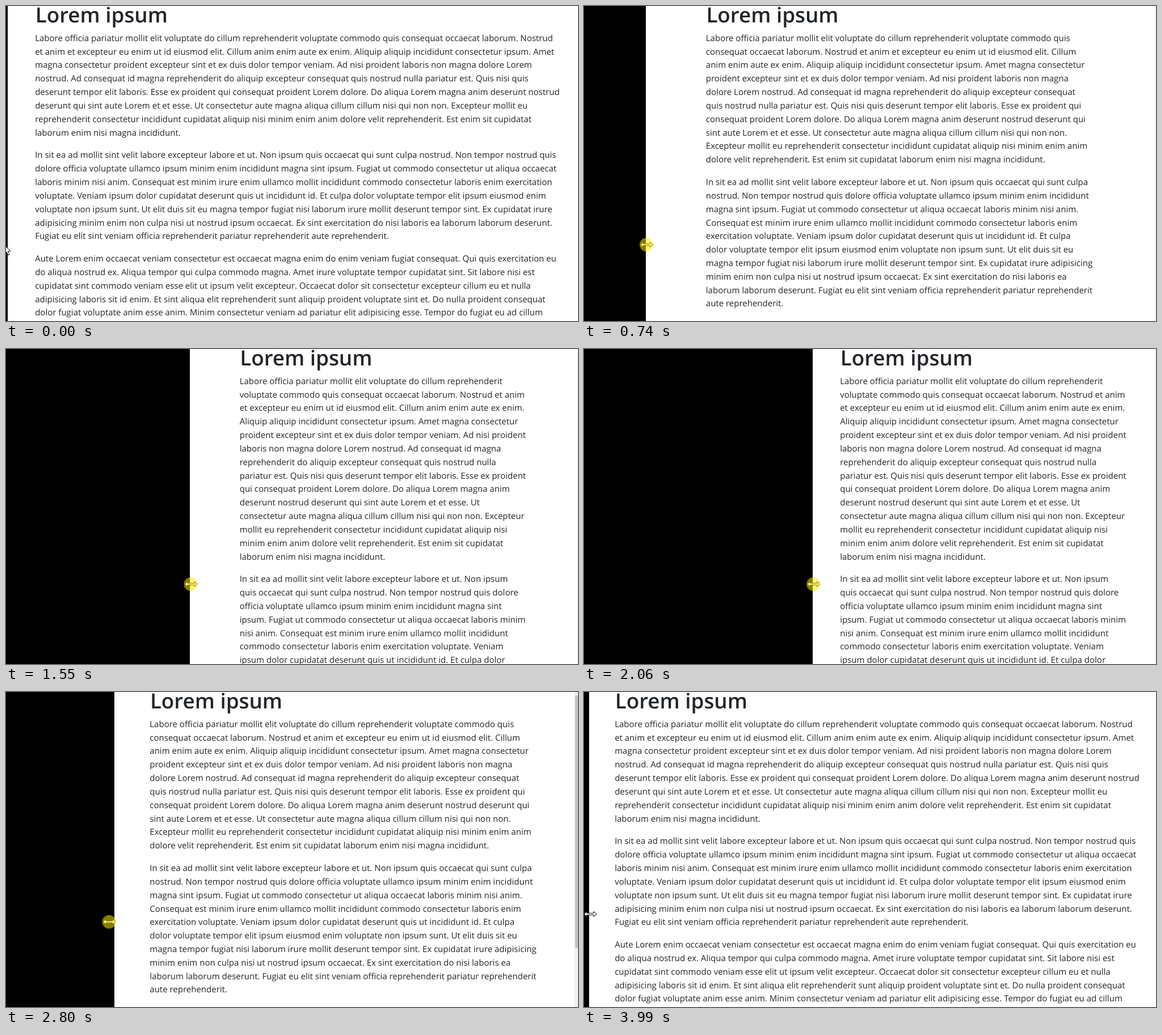
Animation, 1008 px wide and 556 px high, one loop 4.06 s. Source, as an HTML page with a canvas:

```html
<!DOCTYPE html>
<html lang="la">
<head>
<meta charset="utf-8">
<title>Lorem ipsum</title>
<style>
html, body { margin: 0; width: 100%; height: 100%; overflow: hidden; background: #fff; }
canvas { display: block; }
</style>
</head>
<body>
<canvas id="stage" width="1008" height="556"></canvas>
<script>
const W = 1008, H = 556, LOOP = 4060, TICK = 73.6;
const ZOOM = 0.993, LINE = 24 * ZOOM, GAP = 16 * ZOOM;
const ctx = document.getElementById('stage').getContext('2d');

// Line breaks: | in the wide layout, / in the medium one, ~ in the narrow one.
const paragraphs = [
  `Labore officia pariatur mollit elit voluptate do cillum reprehenderit~ voluptate commodo quis/
  consequat occaecat laborum. Nostrud| et anim~ et excepteur eu enim ut id eiusmod elit. Cillum/
  anim enim aute ex enim.~ Aliquip aliquip incididunt consectetur ipsum. Amet| magna consectetur/~
  proident excepteur sint et ex duis dolor tempor veniam. Ad nisi proident~ laboris non magna/
  dolore Lorem| nostrud. Ad consequat id magna~ reprehenderit do aliquip excepteur consequat/
  quis nostrud nulla~ pariatur est. Quis nisi quis| deserunt tempor elit laboris. Esse ex proident~ qui/
  consequat proident Lorem dolore. Do aliqua Lorem magna anim~ deserunt nostrud| deserunt qui/
  sint aute Lorem et et esse. Ut~ consectetur aute magna aliqua cillum cillum nisi qui non non./
  Excepteur~ mollit eu| reprehenderit consectetur incididunt cupidatat aliquip nisi~ minim enim anim/
  dolore velit reprehenderit. Est enim sit cupidatat|~ laborum enim nisi magna incididunt.`,
  `In sit ea ad mollit sint velit labore excepteur labore et ut. Non ipsum~ quis occaecat qui sunt culpa/
  nostrud. Non tempor nostrud quis| dolore~ officia voluptate ullamco ipsum minim enim incididunt/
  magna sint~ ipsum. Fugiat ut commodo consectetur ut aliqua occaecat| laboris minim~ nisi anim./
  Consequat est minim irure enim ullamco mollit incididunt~ commodo consectetur laboris enim/
  exercitation| voluptate. Veniam~ ipsum dolor cupidatat deserunt quis ut incididunt id. Et culpa/
  dolor~ voluptate tempor elit ipsum eiusmod enim| voluptate non ipsum sunt. Ut elit duis sit eu/
  magna tempor fugiat nisi laborum irure mollit deserunt tempor sint. Ex cupidatat irure| adipisicing/
  minim enim non culpa nisi ut nostrud ipsum occaecat. Ex sint exercitation do nisi laboris ea/
  laborum laborum deserunt.| Fugiat eu elit sint veniam officia reprehenderit pariatur reprehenderit/
  aute reprehenderit.`,
  `Aute Lorem enim occaecat veniam consectetur est occaecat magna enim do enim veniam fugiat consequat. Qui quis exercitation eu|
  do aliqua nostrud ex. Aliqua tempor qui culpa commodo magna. Amet irure voluptate tempor cupidatat sint. Sit labore nisi est|
  cupidatat sint commodo veniam esse elit ut ipsum velit excepteur. Occaecat dolor sit consectetur excepteur cillum eu et nulla|
  adipisicing laboris sit id enim. Et sint aliqua elit reprehenderit sunt aliquip proident voluptate sint et. Do nulla proident consequat|
  dolor fugiat voluptate anim esse anim. Minim consectetur veniam ad pariatur elit adipisicing esse. Tempor do fugiat eu ad cillum`
];

function breakLines(mark) {
  return paragraphs.map(p => p.split(mark).map(
    s => s.replace(/[|\/~]/g, '').replace(/\s+/g, ' ').trim()));
}

const layouts = {
  wide: { width: 960, text: breakLines('|'), thumb: 0 },
  medium: { width: 720, text: breakLines('/'), thumb: 452 },
  narrow: { width: 540, text: breakLines('~'), thumb: 345 }
};

// Drag path: key points [tick, x] joined by a smooth curve.
const path = [[3, 4], [10, 109.5], [12, 165], [21, 325], [30, 411], [31, 411], [38, 181], [43, 60], [47, 10]];

function slope(i) {
  if (i === 0 || i === path.length - 1) return 0;
  const [[a, va], [b, vb], [c, vc]] = path.slice(i - 1, i + 2);
  const h = b - a, k = c - b;
  return (h * (vc - vb) / k + k * (vb - va) / h) / (h + k);
}

function dragX(n) {
  const i = path.findIndex(([tick]) => tick >= n);
  if (i < 0) return path[path.length - 1][1];
  if (i === 0) return path[0][1];
  const [a, va] = path[i - 1], [b, vb] = path[i];
  const h = b - a, u = (n - a) / h, w = 1 - u;
  return va * w * w * (1 + 2 * u) + vb * u * u * (3 - 2 * u)
    + h * u * w * (slope(i - 1) * w - slope(i) * u);
}

const clamp = u => Math.min(1, Math.max(0, u));
const smooth = u => u * u * (3 - 2 * u);
const dragY = n => 430 - 15 * clamp((n - 3) / 12) - 23 * smooth(clamp((n - 31) / 16));

function drawPage(edge, right) {
  const layout = edge <= 37 ? layouts.wide : edge <= 259 ? layouts.medium : layouts.narrow;
  if (layout === layouts.wide) right += 17;
  const x = edge + (right - edge - layout.width * ZOOM) / 2 + 15 * ZOOM - 0.6;

  ctx.fillStyle = '#fff';
  ctx.fillRect(0, 0, W, H);
  ctx.fillStyle = '#212529';
  ctx.font = '600 36.8px "Open Sans", "Noto Sans", sans-serif';
  ctx.letterSpacing = '0px';
  ctx.fillText('Lorem ipsum', x + 0.6, 29);

  ctx.font = '15px "Open Sans", "Noto Sans", sans-serif';
  ctx.letterSpacing = '0.005px';
  let y = 61.8;
  for (const lines of layout.text) {
    for (const line of lines) {
      if (y < H + 12) ctx.fillText(line, x, Math.round(y));
      y += LINE;
    }
    y += GAP;
  }

  if (layout.thumb) {
    ctx.fillStyle = '#f1f1f1';
    ctx.fillRect(right - 1, 0, 17, H);
    ctx.fillStyle = '#c1c1c1';
    ctx.fillRect(right + 1, 6, 13, layout.thumb - 6);
  }
  ctx.fillStyle = '#000';
  ctx.fillRect(0, 0, edge, H);
}

function drawShape(x, y, points) {
  ctx.beginPath();
  for (const [px, py] of points) ctx.lineTo(x + px, y + py);
  ctx.closePath();
  ctx.fillStyle = '#fff';
  ctx.strokeStyle = '#000';
  ctx.lineWidth = 1;
  ctx.fill();
  ctx.stroke();
}

const pointer = [[0, 0], [0, 16], [4, 12.5], [6.5, 18], [9, 17], [6.5, 11.5], [11, 11.5]];
const half = [[-11, 0], [-6, -4.5], [-6, -1.5], [6, -1.5], [6, -4.5]];
const resizer = half.concat(half.map(([x, y]) => [-x, -y]));

function draw(t) {
  const n = Math.min(Math.floor((t + 5) / TICK), t < 3990 ? 53 : 54);
  const x = dragX(n), y = dragY(n);
  // Dragged to the left, the window trails the cursor.
  const lag = Math.max(0, dragX(n - 1) - x);
  drawPage(Math.round(x - 1 + 0.35 * lag), Math.round(1006.5 - lag / 7));

  if (n < 1) {
    drawShape(-3, 421.5, pointer);
    return;
  }
  drawShape(x + 1, y, resizer);
  if (n >= 4 && n < 54) {
    ctx.fillStyle = 'rgba(255, 236, 0, 0.53)';
    ctx.beginPath();
    ctx.arc(x + 0.5, y, 12, 0, 2 * Math.PI);
    ctx.fill();
  }
}

ctx.textRendering = 'geometricPrecision';
const start = performance.now();
function frame() {
  draw((performance.now() - start) % LOOP);
  requestAnimationFrame(frame);
}
frame();
</script>
</body>
</html>
```
